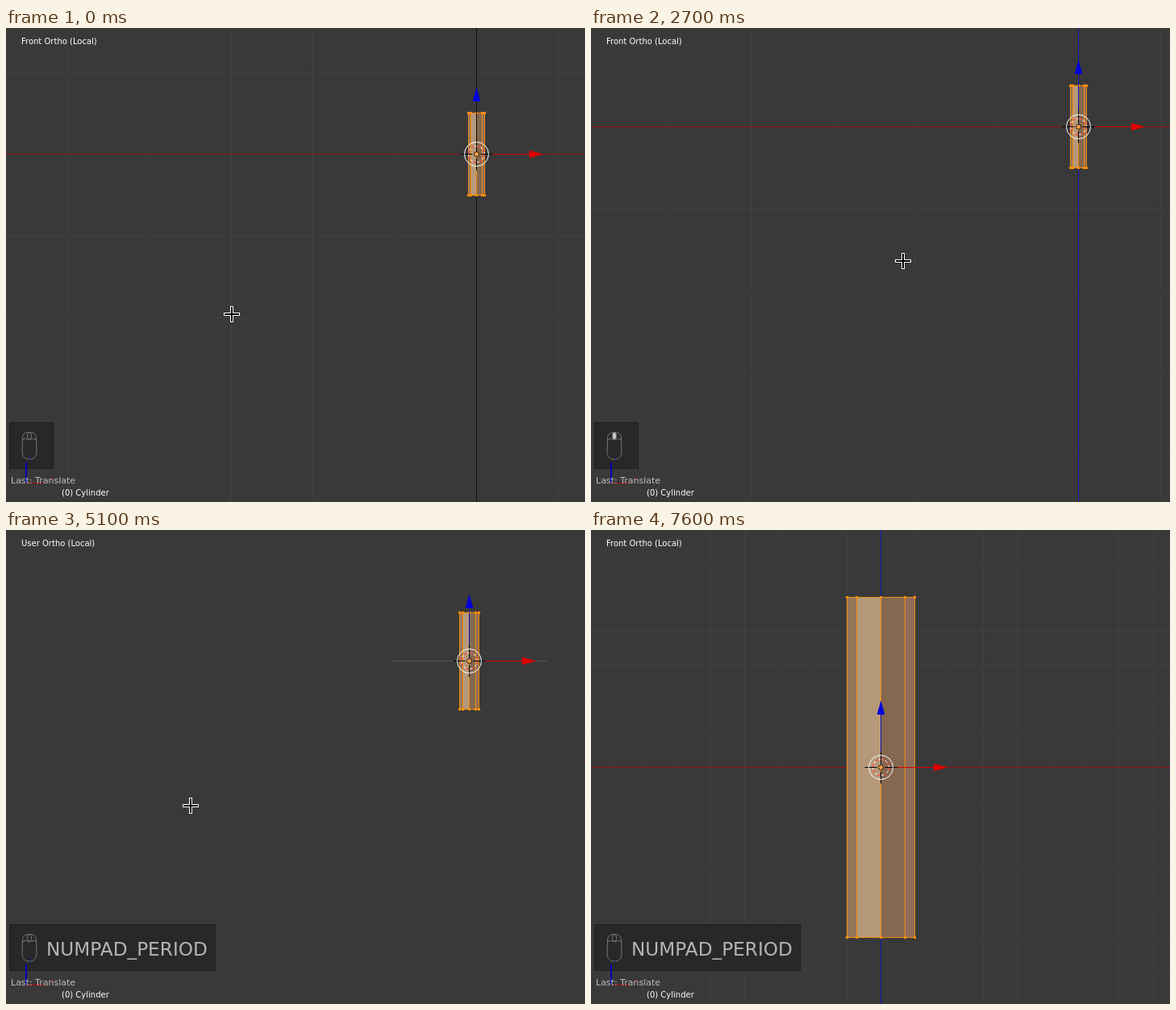
These frames come from a looping animation (718x588 px, 8200 ms). An HTML page with a canvas:

```html
<!DOCTYPE html>
<html>
<head>
<meta charset="utf-8">
<style>
html, body { margin: 0; width: 718px; height: 588px; overflow: hidden; background: #393939; }
canvas { display: block; }
</style>
</head>
<body>
<canvas id="stage" width="718" height="588"></canvas>
<script>
const W = 718, H = 588, LOOP = 8200, UNIT = 101.5, ZOOMED = 422;
const BLUE = '#1414b4', ORANGE = '#f08c14';
const g = document.getElementById('stage').getContext('2d');

const mix = (a, b, f) => a + (b - a) * f;
const ramp = (t, from, to) => Math.min(1, Math.max(0, (t - from) / (to - from)));
const smooth = (t, from, to) => {
  const f = ramp(t, from, to);
  return f * f * (3 - 2 * f);
};
const pixel = v => Math.floor(v + .001) + .5;

// Pan away and back, then zoom until the object fills the view
function viewAt(t) {
  const nudge = ramp(t, 2200, 2300), away = smooth(t, 2300, 2700), back = smooth(t, 2700, 3500);
  const x = 583 - nudge + 22 * away - 16 * back;
  const y = 156 - nudge - 33 * away + 32 * back;
  const zoom = smooth(t, 5042, 5242);
  const h = 1 / mix(1 / UNIT, 1 / ZOOMED, zoom);
  const k = (1 - zoom) * h / UNIT;
  return { cx: pixel(359 + (x - 359) * k), cy: pixel(294 + (y - 294) * k), h };
}

// Hand moves: start, end, x, y
const moves = [
  [0, 400, 335, 394], [400, 700, 397, 332], [1000, 1300, 421, 310], [1900, 2100, 371, 323],
  [2200, 2700, 387, 289], [2700, 3500, 376, 321], [3600, 3900, 457, 292], [3900, 4300, 229, 342]
];

function pointerAt(t) {
  if (t > 6100) {
    // Sweep round the object, then leave through the top
    const a = mix(1.98, 7.04, ramp(t, 6100, 7000)), out = ramp(t, 7200, 7600);
    return [278 + 124 * Math.cos(a) + 75 * out, 242 + 114 * Math.sin(a) - 345 * out];
  }
  let x = 280, y = 355;
  for (const [from, to, nx, ny] of moves) {
    const f = smooth(t, from, to);
    x = mix(x, nx, f);
    y = mix(y, ny, f);
  }
  return [x, y];
}

function line(color, x1, y1, x2, y2, width = 1) {
  g.strokeStyle = color;
  g.lineWidth = width;
  g.beginPath();
  g.moveTo(x1, y1);
  g.lineTo(x2, y2);
  g.stroke();
}

const across = (color, y, x1 = 0, x2 = W) => line(color, x1, pixel(y), x2, pixel(y));
const down = (color, x, y1 = 0, y2 = H) => line(color, pixel(x), y1, pixel(x), y2);

function rect(color, x, y, w, h) {
  g.fillStyle = color;
  g.fillRect(x, y, w, h);
}

function text(str, x, y, size, color) {
  g.font = size + 'px "DejaVu Sans", sans-serif';
  g.fillStyle = color;
  g.fillText(str, x, y);
}

function circle(x, y, r, stroke, fill) {
  g.beginPath();
  g.arc(x, y, r, 0, Math.PI * 2);
  if (fill) { g.fillStyle = fill; g.fill(); }
  g.strokeStyle = stroke;
  g.stroke();
}

function arrow(color, angle) {
  g.save();
  g.rotate(angle);
  g.fillStyle = color;
  g.beginPath();
  g.moveTo(83, 0);
  g.lineTo(65.5, -4.8);
  g.lineTo(65.5, 4.8);
  g.fill();
  g.restore();
}

function grid({ cx, cy, h }, upColor) {
  const step = h > 200 ? h / 10 : h;
  for (let x = cx % step; x < W; x += step) down('#404040', x);
  for (let y = cy % step; y < H; y += step) across('#404040', y);
  across('#910c10', cy);
  down(upColor, cx);
}

function cylinder({ cx, cy, h }) {
  const top = cy - h / 2, bottom = cy + h / 2;
  const xs = [0, 1, 2, 3, 4].map(i => cx - h / 10 * Math.cos(i * Math.PI / 4));
  ['#947759', '#b59979', '#84684f', '#8d6c5a'].forEach((c, i) => rect(c, xs[i], top, xs[i + 1] - xs[i], h));
  for (const x of xs) down(ORANGE, x, top, bottom);
  for (const y of [top, bottom]) {
    across(ORANGE, y, xs[0], xs[4]);
    for (const x of xs) rect('#ff8c0a', Math.floor(x) - 1, Math.floor(y) - 1, 3, 3);
  }
}

function gizmo({ cx, cy }, upColor) {
  g.save();
  g.translate(cx, cy);
  line(upColor, 0, -66, 0, 0);
  line('#dc0000', 15, 0, 66, 0);
  arrow('#0000dc', -Math.PI / 2);
  arrow('#dc0000', 0);
  circle(0, 0, 10, '#fff');
  g.setLineDash([4, 4]);
  circle(0, 0, 10, '#f00');
  g.setLineDash([]);
  for (const s of [-1, 1]) {
    line('#000', 5 * s, 0, 20 * s, 0);
    line('#000', 0, 5 * s, 0, 20 * s);
  }
  circle(0, 0, 15, '#fff');
  circle(0, 0, 3, '#201000', '#f5a04a');
  g.restore();
}

function pointer(x, y) {
  x = Math.round(x);
  y = Math.round(y);
  for (const [color, width, r] of [['#fff', 4, 10], ['#000', 2, 9]]) {
    line(color, x - r, y, x + r, y, width);
    line(color, x, y - r, x, y + r, width);
  }
}

const mouseShape = new Path2D('M20.5 510C20.5 504 23 501.5 29 501.5S37.5 504 37.5 510L38 525C38 532 34.5 535 29 535S20 532 20 525Z' +
  'M20.5 511Q24 508 26.5 510Q29 512 31.5 510Q34 508 37.5 511');

function keyPanel(pressed, label) {
  const w = label ? 256 : 55;
  rect('#1e1e1e', 4, 489, w, 58);
  rect('#282828', 5, 490, w - 2, 56);
  g.strokeStyle = '#777';
  g.lineWidth = 1;
  g.stroke(mouseShape);
  g.beginPath();
  g.ellipse(29, 506, 2.5, 4.2, 0, 0, Math.PI * 2);
  if (pressed) { g.fillStyle = '#c8c8c8'; g.fill(); }
  g.stroke();
  if (label) text(label, 50, 528, 23.2, '#b4b4b4');
}

function miniAxes() {
  line('#0000c0', 25, 539, 25, 564, 2);
  across('#c00000', 564, 25, 47);
  text('z', 28, 537, 8, '#1a1a70');
  text('x', 54, 562, 8, '#901515');
}

function draw(t) {
  const view = viewAt(t), { cx, cy, h } = view;
  const turning = t >= 5100 && t < 5300;
  const upColor = t < 2300 ? '#101010' : BLUE;

  rect('#393939', 0, 0, W, H);
  if (turning) across('#585858', cy, cx - h * .8, cx + h * .8);
  else grid(view, upColor);
  cylinder(view);
  gizmo(view, upColor);

  keyPanel(t >= 1800 && t < 3700, t >= 5100 && 'NUMPAD_PERIOD');
  miniAxes();
  text('Last: Translate', 6, 565, 11, '#bebebe');
  text((turning ? 'User' : 'Front') + ' Ortho (Local)', 19, 20, 10, '#fff');
  text('(0) Cylinder', 69, 580, 10, '#fff');
  pointer(...pointerAt(t));
}

function tick() {
  draw(Math.floor(performance.now() % LOOP / 100) * 100);
  requestAnimationFrame(tick);
}
tick();
</script>
</body>
</html>
```
